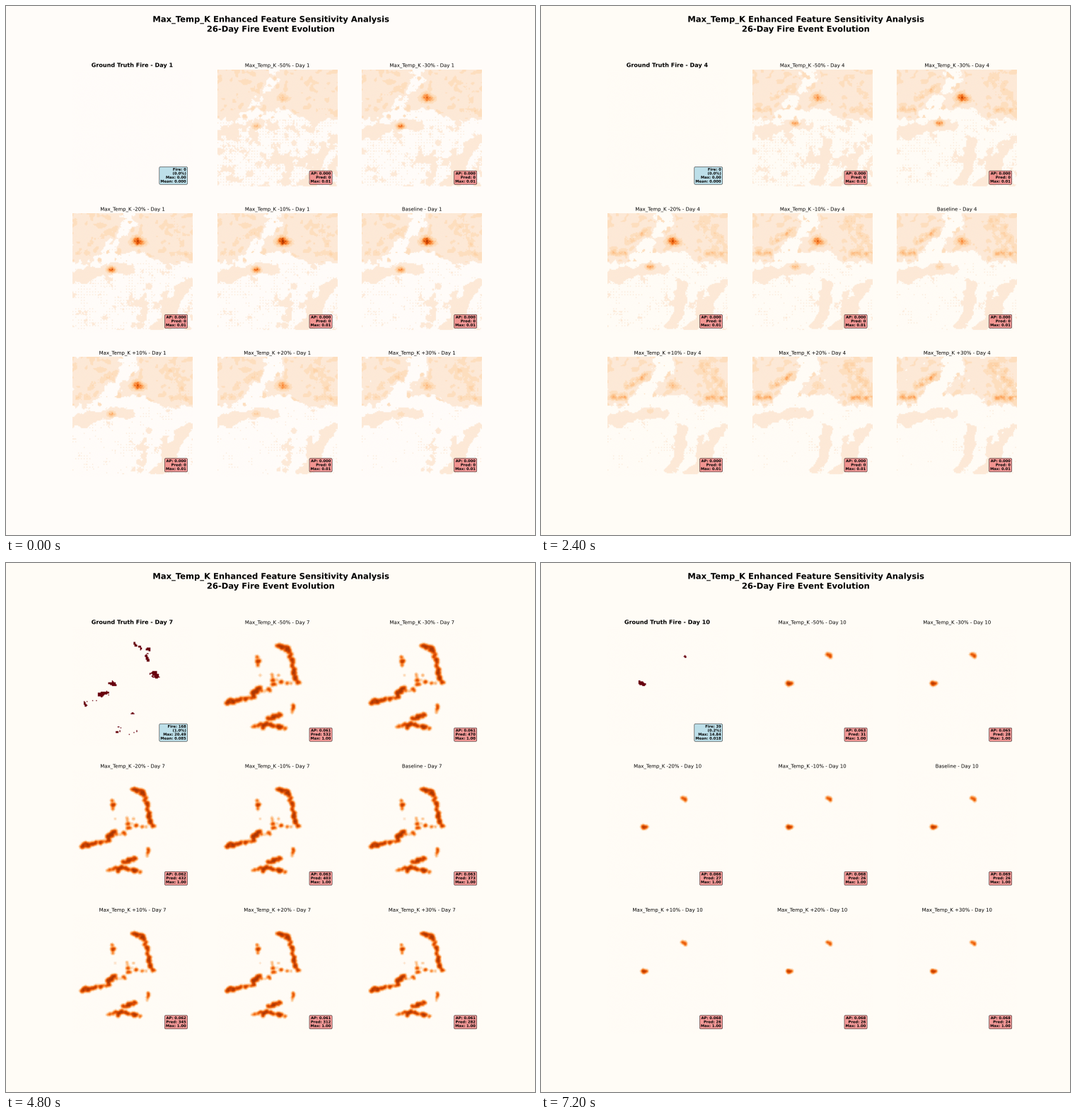
A matplotlib script for the animation above (8 s loop, 748x748 px).

```python
import numpy as np
import matplotlib.pyplot as plt
from matplotlib.animation import FuncAnimation
from matplotlib.path import Path
from matplotlib.patheffects import Normal

plt.rcParams.update({
    "font.family": "DejaVu Sans",
    "text.hinting": "none",
    "path.effects": [Normal()],       # draws text as smooth outlines
})
N, SIDE, K = 128, 169.4, 17 / 18      # cells, panel side in px, point-size scale
DAYS = 10
SCALES = [-.5, -.3, -.2, -.1, 0, .1, .2, .3]
LABELS = ["Baseline" if s == 0 else f"Max_Temp_K {s * 100:+.0f}%" for s in SCALES]

axis = (np.arange(N) + .5) * SIDE / N
X, Y = np.meshgrid(axis, axis)
ROW, COL = np.indices((N, N))
DOT = (ROW % 3 == 0) & (COL % 3 == 0)
LOW = np.clip((Y - 66) / 12, 0, 1)


def blur(a, sigma):
    r = int(3 * sigma) + 1
    k = np.exp(-.5 * (np.arange(-r, r + 1) / sigma) ** 2)
    k /= k.sum()
    for ax in (0, 1):
        pad = [(r, r) if i == ax else (0, 0) for i in (0, 1)]
        a = np.apply_along_axis(np.convolve, ax, np.pad(a, pad, mode="edge"), k, "valid")
    return a


def noise(seed, sigma):
    n = blur(np.random.default_rng(seed).standard_normal((N, N)), sigma)
    return (n - n.mean()) / n.std()


def region(soft, *points):
    inside = Path(points).contains_points(np.c_[X.ravel(), Y.ravel()])
    return blur(inside.reshape(N, N).astype(float), soft)


def bump(x, y, sx, sy):
    return np.exp(-.5 * (((X - x) / sx) ** 2 + ((Y - y) / sy) ** 2))


def streak(x0, y0, x1, y1, width):
    dx, dy = x1 - x0, y1 - y0
    t = np.clip(((X - x0) * dx + (Y - y0) * dy) / (dx * dx + dy * dy), 0, 1)
    return np.exp(-.5 * (np.hypot(X - x0 - t * dx, Y - y0 - t * dy) / width) ** 2)


BASE, FINE, SPECK = noise(3, 1.8), noise(5, .7), noise(8, 2.4)

# ---- background risk map, days 1 to 5 ----
NORTH = (region(4.5, (-5, 2), (61, -5), (68, 14), (56, 34), (41, 44), (34, 61), (17, 71), (-5, 62))
         + region(4.5, (83, -5), (175, -5), (175, 70), (124, 70), (112, 54), (66, 54), (62, 42),
                  (85, 29), (100, 22)))
BAND = region(2, (-5, 85), (20, 78), (37, 78), (57, 71), (85, 74), (88, 85), (61, 88),
              (46, 89), (30, 93), (17, 101), (-5, 97))
COAST = (region(2, (169, 91), (166, 108), (152, 125), (149, 145), (132, 166), (100, 166),
                (125, 149), (128, 110), (152, 98))
         - .9 * bump(140, 114, 5, 8))
VALLEY = region(2, (100, 93), (113, 97), (107, 145), (90, 164), (76, 164), (94, 142), (94, 118))
STREAKS = (streak(28, 41, 54, 26, 3) + streak(8, 57, 24, 56, 3)
           + streak(140, 58, 164, 57, 3) + .45 * streak(140, 14, 156, 42, 9))
RIDGE = bump(93, 42, 6, 3) + .6 * bump(91, 37, 3.5, 3)


def haze(day, s):
    daily = noise(20 + day, 1.6)
    rough = .8 * BASE + .6 * daily
    south = (BAND + COAST + min(1, .3 + .17 * day) * VALLEY) * (1 + .9 * min(0, s + .2))
    level = NORTH + south + .17 * rough - .5
    level += (1 - LOW) * (.17 / day - .4 * s) - LOW * .35 * max(s, 0)

    # sparse lattice dots in the south, more of them at low scales
    reach = .27 + .16 * np.cos(np.pi * (day - 1) / 2) - s
    scatter = SPECK + .4 * FINE - (1.6 - 2.6 * reach)
    sparse = (LOW > .5) & (DOT & (scatter > 0) | (scatter > 1.5))
    v = .1 * ((level > 0) | DOT & (level > -.12) | sparse) * (Y < 166)

    grain = .8 + .45 * DOT + .15 * FINE
    growth = np.interp(day, [1, 5], [.35, .9]) * (.08 + .25 * (s + .5))
    v += (v > 0) * (growth * STREAKS * np.clip(grain + .4 * daily, 0, 2)
                    + .035 * (rough > 1.1) * (1 - LOW))

    # two hot spots, strongest near one scale that moves from day to day
    best = np.interp(day, [1, 2, 4], [-.08, .07, -.25])
    peak = np.interp(day, [1, 2, 4, 5], [.75, .55, .6, 0])
    hollow = bump(53 + 1.8 * day, 82 - 1.4 * day, 3.4, 2.4)
    for spot, centre in ((RIDGE, best), (hollow, best - .1)):
        v = v + grain * peak * np.exp(-((s - centre) / .32) ** 2) * spot
    return v


# ---- fire fronts: (blobs, size, spread, path) ----
FRONTS = {
    5: [(26, 6, 2.2, [(94, 36), (95, 80)]), (14, 3.3, 3, [(80, 40), (69, 41)]),
        (18, 3.6, 3, [(82, 57), (69, 67)]), (9, 1.7, 2.5, [(104, 60), (112, 84)]),
        (9, 2.4, 1.1, [(92, 90), (76, 104)]), (9, 2, 1, [(100, 88), (82, 98)]),
        (10, 1.6, 1, [(104, 98), (106, 124)]), (9, 1.7, 1, [(84, 106), (88, 120), (97, 142)]),
        (14, 2.5, 1.2, [(98, 136), (84, 143), (72, 152)]), (4, 2.5, 1, [(21, 109), (25, 107)])],
    6: [(9, 2.8, 1, [(85, 27), (101, 33)]), (13, 2.8, 1, [(102, 36), (106, 52), (108, 70), (115, 81)]),
        (5, 1.8, 1.5, [(56, 46), (58, 53)]), (8, 1, 3, [(66, 70), (86, 72)]),
        (10, 3.2, 1.6, [(57, 87), (50, 98)]), (13, 1.7, 1.8, [(56, 94), (76, 90), (80, 78), (112, 82)]),
        (12, 2.5, 1, [(14, 108), (24, 106), (46, 101)]), (4, 1.4, .6, [(107, 112), (106, 121)]),
        (10, 2.4, 1.3, [(70, 131), (88, 126)]), (14, 2.3, 1.2, [(50, 142), (68, 138), (95, 144)])],
    7: [(4, 2, .6, [(87, 25), (96, 32)]), (4, 2.4, .5, [(107, 33)]), (5, 2, .4, [(105, 40), (106, 49)]),
        (8, 4.3, .9, [(115, 66), (118, 71)]), (5, 3, .5, [(53, 81), (58, 81)]),
        (6, 2.8, .7, [(39, 97), (48, 95)]), (3, 2.2, .5, [(18, 111)]), (3, 1.5, .5, [(62, 149), (66, 149)]),
        (8, .8, 4, [(60, 142), (94, 146)]), (5, .9, 1, [(18, 106), (38, 106)]), (2, 1.4, .5, [(85, 124)])],
    8: [(3, 1.4, .6, [(92, 29), (103, 34)]), (3, 1.6, .5, [(103, 42), (106, 43)]),
        (2, 1.2, .4, [(65, 65), (67, 70)]), (4, 1.5, .6, [(111, 68), (116, 66)]),
        (4, 1.9, .5, [(51, 82), (55, 81)]), (2, 1.4, .3, [(42, 95)])],
    9: [(4, 2.4, .4, [(107, 41), (109, 43)]), (4, 2.5, .4, [(50, 81), (54, 81)])],
    10: [(3, 1.9, .3, [(108, 42), (109, 43)]), (7, 2.8, .6, [(45, 80), (51, 82)])],
}
CORE = [(14, 6.3, 2, [(72, 36), (74, 45)]), (10, 4.5, 1.2, [(88, 35), (102, 36)]),
        (16, 7, 2, [(74, 58), (68, 69)]), (9, 5.5, 1.2, [(77, 88), (84, 93)]),
        (5, 3.6, 1, [(79, 100), (84, 105)]), (12, 3.6, .8, [(74, 149), (84, 143), (92, 133)]),
        (3, 3, .5, [(95, 129)]), (5, 4.6, .8, [(24, 108)])]
SMOKE = [(14, 15, 4, [(86, 40), (90, 70)]), (6, 6, 2, [(80, 90), (84, 104)]),
         (5, 2.5, 1, [(104, 100), (110, 146)])]


def stamp(fronts):
    """Cells covered by seeded blobs strung along each path."""
    mask = np.zeros((N, N), bool)
    rng = np.random.default_rng(4)
    for count, size, spread, path in fronts:
        t = np.linspace(0, len(path) - 1, count)
        xs, ys = (np.interp(t, range(len(path)), c) + rng.normal(0, spread, count) for c in zip(*path))
        for x, y, r in zip(xs, ys, size * rng.uniform(.6, 1, count)):
            mask |= np.hypot((X - x) / 1.2, Y - y) < r * (1 + .25 * FINE)
    return mask


def heat(day):
    """Smoothed fire of the day before, which the models predict from."""
    if day > 6:
        return blur(stamp(FRONTS[day - 1]).astype(float), 1.15)
    smoke = blur(stamp(SMOKE).astype(float), 3)
    return blur(stamp(CORE).astype(float), 1.9) + .25 * smoke * (.6 + .9 * DOT + .1 * FINE)


def plume(warm, day, s):
    sharp = 1 + (1.1 if day == 6 else .4) * (s + .5)
    return 1 - np.exp(-2.5 * np.maximum(warm, 0) ** sharp)


# ---- readouts shown in the boxes; days left out lie between their neighbours ----
FIRE = {5: [1348, 20, 1.024], 6: [766, 20, .428], 8: [37, 21, .017], 10: [39, 14.84, .018]}
AP = {5: [16, 15, 14, 14, 13, 12, 12, 12], 6: [61, 60, 60, 62, 62, 60, 59, 58],
      8: [61, 63, 64, 65, 65, 64, 64, 64], 10: [63, 65, 66, 68, 69, 68, 68, 68]}
PRED = {6: [1527, 1254, 1129, 1008, 911, 792, 687, 590], 8: [185, 176, 165, 161, 153, 150, 142, 135],
        10: [31, 28, 27, 26, 26, 26, 26, 24]}


def readout(table, day):
    if day < min(table):
        return np.zeros(8)
    if day in table:
        return np.array(table[day])
    return np.sqrt(np.multiply(table[day - 1], table[day + 1]))


# ---- figure ----
fig, grid = plt.subplots(3, 3, figsize=(17, 17), dpi=44)
fig.suptitle("Max_Temp_K Enhanced Feature Sensitivity Analysis\n26-Day Fire Event Evolution",
             fontsize=20 * K, fontweight="bold", y=.982)


def panel(ax, color, size, weight):
    ax.set_axis_off()
    image = ax.imshow(np.ones((N, N, 3)))
    title = ax.set_title("", fontsize=size * K, fontweight=weight, pad=6 * K)
    box = ax.text(.95, .05, "", transform=ax.transAxes, ha="right", va="bottom",
                  fontsize=9 * K, fontweight="bold",
                  bbox=dict(boxstyle="round,pad=0.3", facecolor=color, alpha=.8, linewidth=K))
    return image, title, box


panels = [panel(ax, "lightcoral" if i else "lightblue", 12 if i else 14, "normal" if i else "bold")
          for i, ax in enumerate(grid.flat)]

PEACH = np.array([253, 233, 215]) / 255
DARK_RED = np.array([103, 0, 13]) / 255
ORANGES = plt.cm.Oranges(np.linspace(.17, .92, 14))[:, :3]


def show(image, rgb):
    # enlarged cells keep their edges crisp when resampled
    image.set_data(rgb.repeat(4, axis=0).repeat(4, axis=1))


def update(frame):
    day = frame + 1
    paper = np.array([255, 252, 249 if day in (1, 5) else 246]) / 255
    fig.set_facecolor(paper)
    palette = np.vstack([paper, PEACH, ORANGES])

    image, title, box = panels[0]
    show(image, np.where(stamp(FRONTS.get(day, []))[..., None], DARK_RED, paper))
    title.set_text(f"Ground Truth Fire - Day {day}")
    count, top, mean = readout(FIRE, day)[:3]
    box.set_text(f"Fire: {count:.0f}\n({100 * count / N ** 2:.1f}%)\nMax: {top:.2f}\nMean: {mean:.3f}")

    warm = heat(day) if day > 5 else None
    ap, pred = readout(AP, day) / 1000, readout(PRED, day)
    for k, (image, title, box) in enumerate(panels[1:]):
        v = haze(day, SCALES[k]) if day < 6 else plume(warm, day, SCALES[k])
        show(image, palette[np.clip(v * 16, 0, 15).astype(int)])
        title.set_text(f"{LABELS[k]} - Day {day}")
        box.set_text(f"AP: {ap[k]:.3f}\nPred: {pred[k]:.0f}\nMax: {.01 if day < 6 else 1:.2f}")
    return []


anim = FuncAnimation(fig, update, frames=DAYS, interval=800, repeat=True, repeat_delay=0, blit=False)
plt.show()
```
